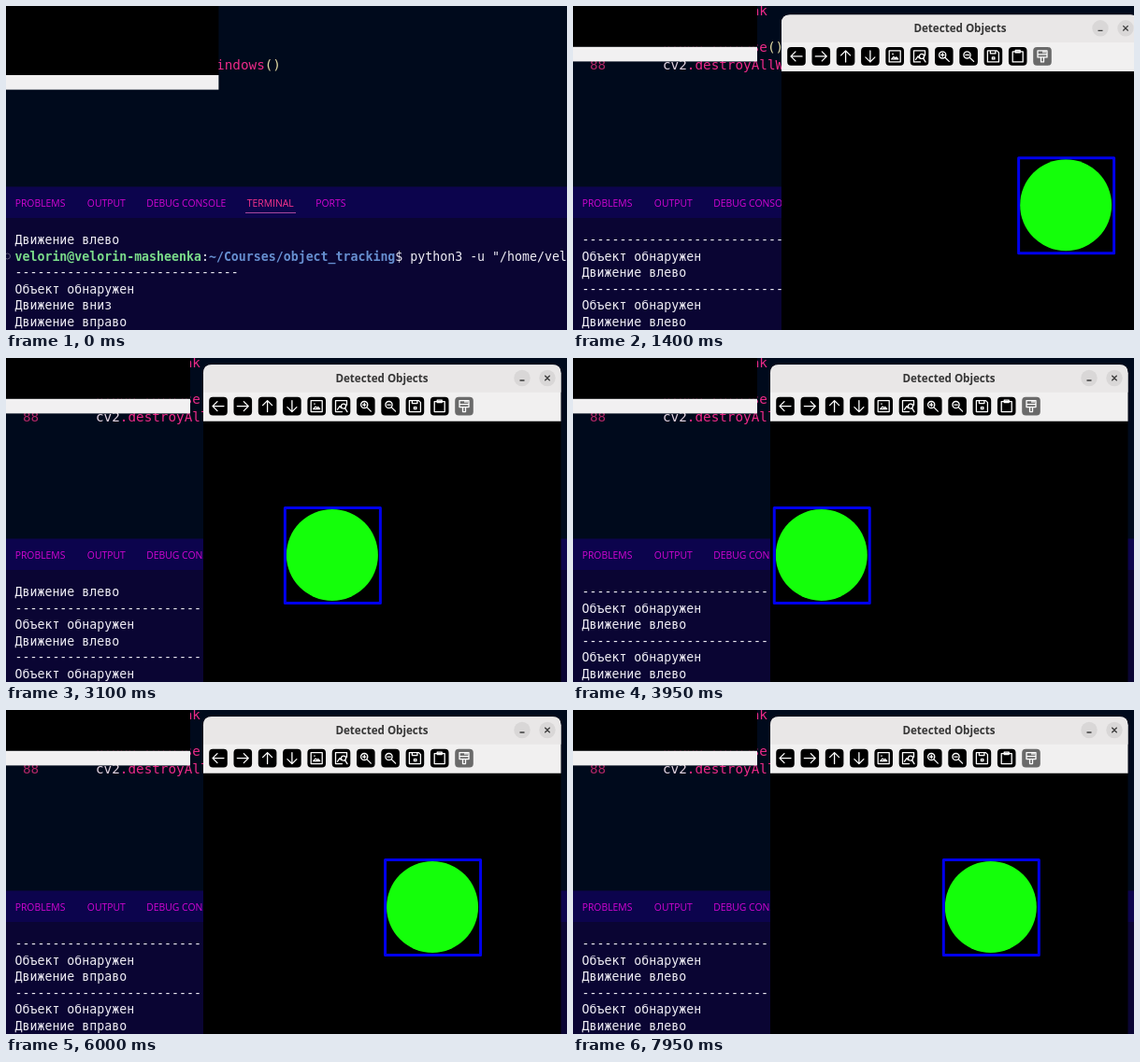
Animation, 600 px wide and 347 px high, one loop 8000 ms. Source, as an HTML page:

```html
<!DOCTYPE html>
<html lang="ru">
<head>
<meta charset="utf-8">
<title>Detected Objects</title>
<style>
  html, body { margin: 0; width: 100%; height: 100%; overflow: hidden; background: #000a1c; }
  svg { display: block; width: 600px; height: 347px; }
  .code { font: 14.3px "DejaVu Sans Mono", monospace; fill: #ec2a88; }
  .code .name { fill: #e2d3e0; }
  .code .paren { fill: #e0d8a2; }
  .tabs { font: 500 10.4px "Open Sans", sans-serif; fill: #d206d2; }
  .tabs .active { fill: #f8348c; }
  .term { font: 13.26px "DejaVu Sans Mono", monospace; fill: #efedf5; }
  .term .user { fill: #7bdc8a; font-weight: bold; }
  .term .path { fill: #668fd0; font-weight: bold; }
  .title { font: 700 11.6px "Open Sans", sans-serif; fill: #363636; text-anchor: middle; }
  .glyph { fill: none; stroke: #fff; stroke-width: 1.3; stroke-linecap: round; stroke-linejoin: round; }
</style>
</head>
<body>
<svg viewBox="0 0 600 347">
  <defs>
    <clipPath id="canvasClip"><rect y="60.5" width="382.5" height="300"/></clipPath>
  </defs>

  <rect width="600" height="347" fill="#000a1c"/>
  <g class="code">
    <text x="164.9" y="10">break</text>
    <text x="96" y="49">video.release<tspan class="paren">()</tspan></text>
    <text x="18" y="68" fill="#b02666">88</text>
    <text x="96" y="68"><tspan class="name">cv2</tspan>.destroyAllWindows<tspan class="paren">()</tspan></text>
  </g>

  <rect y="193.5" width="600" height="34" fill="#0c044d"/>
  <rect y="227" width="600" height="120" fill="#0a0533"/>
  <g class="tabs">
    <text x="9.7" y="214.5">PROBLEMS</text>
    <text x="86.8" y="214.5">OUTPUT</text>
    <text x="150.2" y="214.5">DEBUG CONSOLE</text>
    <text x="257.7" y="214.5" class="active">TERMINAL</text>
    <text x="331.2" y="214.5">PORTS</text>
    <rect x="256" y="221" width="54" height="1" fill="#a8489c"/>
  </g>

  <g class="term" id="shell">
    <circle cx="1.5" cy="268" r="3" fill="none" stroke="#5d5a78"/>
    <text x="9.5" y="272.6"><tspan class="user">velorin@velorin-masheenka</tspan>:<tspan class="path">~/Courses/object_tracking</tspan>$ python3 -u "/home/velorin/Courses"</text>
  </g>
  <g class="term" id="log"></g>

  <g id="cover">
    <rect id="coverBody" fill="#000"/>
    <rect id="coverEdge" height="15.6" fill="#f1f0f1"/>
  </g>

  <g id="win">
    <path d="M0 360V9Q0 0 9 0H373.5Q382.5 0 382.5 9V360Z" fill="#000"/>
    <path d="M0 60.5V9Q0 0 9 0H373.5Q382.5 0 382.5 9V60.5Z" fill="#f1f0f0"/>
    <path d="M0 29.5V9Q0 0 9 0H373.5Q382.5 0 382.5 9V29.5Z" fill="#e9e7e7"/>
    <text class="title" x="191" y="18.5">Detected Objects</text>
    <g fill="#d9d7d7"><circle cx="341" cy="14.3" r="8.7"/><circle cx="368" cy="14.3" r="8.7"/></g>
    <path d="M338.5 16.8h5M365.3 11.6l5.4 5.4m0-5.4l-5.4 5.4" stroke="#3c3c3c" stroke-width="1.3" fill="none"/>
    <g id="tools"></g>
    <g clip-path="url(#canvasClip)">
      <g id="ball">
        <circle r="49" fill="#14ff0a"/>
        <rect x="-50.5" y="-50.5" width="102" height="102" fill="none" stroke="#0000ec" stroke-width="3" stroke-linejoin="round"/>
      </g>
    </g>
  </g>
</svg>

<script>
const LOOP = 8000, OPEN = 300, LINE = 17.6;
const $ = id => document.getElementById(id);
const SVG = 'http://www.w3.org/2000/svg';

function add(parent, tag, attrs) {
  const el = document.createElementNS(SVG, tag);
  for (const key in attrs) el.setAttribute(key, attrs[key]);
  return parent.appendChild(el);
}

// Toolbar glyphs, drawn around the centre of each button
const lens = 'M2 -1.5a3.6 3.6 0 1 0 -7.2 0a3.6 3.6 0 1 0 7.2 0M1.2 1.3L5.5 5.5';
const frame = 'M-6 -6H6V6H-6Z';
const glyphs = [
  'M6 0H-6M-1 -5L-6 0L-1 5',
  'M-6 0H6M1 -5L6 0L1 5',
  'M0 6V-6M-5 -1L0 -6L5 -1',
  'M0 -6V6M-5 1L0 6L5 1',
  frame + 'M-3.5 3L-1.2 .5L.5 2L1.8 1L3.5 3ZM-2.5 -2.5h.6',
  'M6 -1V-6H-6V6H1M-4 3.5L-1.5 0L0 2M5 0a2.5 2.5 0 1 0 -5 0a2.5 2.5 0 1 0 5 0M4 2L6.5 6',
  lens + 'M-3.2 -1.5H.2M-1.5 -3.2V.2',
  lens + 'M-3.2 -1.5H.2',
  'M-6 -6H4L6 -4V6H-6ZM-3 -5.5V-3H2.5V-5.5M-1 1H1.5V3H-1Z',
  'M-5.5 -5H5.5V6H-5.5ZM-2.5 -6.5H2.5V-4H-2.5Z',
  'M-5 -6H5V1H-5ZM-5 -2H5M-1.5 1V6H1.5V1M1 -6V-4M3 -6V-4'
];
glyphs.forEach((d, i) => {
  const g = add($('tools'), 'g', { transform: `translate(${16 + 26.3 * i} 44.4)` });
  add(g, 'rect', { x: -9.8, y: -9.8, width: 19.6, height: 19.6, rx: 4, fill: i < 10 ? '#000' : '#6a6a6a' });
  add(g, 'path', { d, class: 'glyph' });
});

const rows = Array.from({ length: 6 }, (_, i) =>
  add($('log'), 'text', { x: 9.5, y: 255 + LINE * i }));

// [time, x] of the ball inside the window; it bounces off both sides
const ballSteps = [[0, 230], [1075, 336], [4015, 48.5], [6925, 336.5], [8000, 231]];
// [time, x, y] of the dragged window
const winSteps = [[0, 197, 5.5], [1000, 197, 5.5], [1400, 223, 9.5], [1900, 219, 3],
  [2200, 213, 2], [2600, 211, 7.2], [8000, 211, 7.2]];

function at(steps, t) {
  const n = Math.max(1, steps.findIndex(s => s[0] > t));
  const a = steps[n - 1], b = steps[n];
  const k = (t - a[0]) / (b[0] - a[0]);
  return a.slice(1).map((v, i) => v + (b[i + 1] - v) * k);
}

const RULE = '-'.repeat(30), FOUND = 'Объект обнаружен';
const move = dir => 'Движение ' + dir;
const heading = t => move(t > 1075 && t < 4015 || t > 6925 ? 'влево' : 'вправо');
const startLog = [move('влево'), '', RULE, FOUND, move('вниз'), move('вправо')];

function logLines(t) {
  if (t < OPEN) return startLog;
  const now = heading(t), before = heading(t - 150);
  // The output is now and then caught in the middle of a report
  const partial = Math.floor(t / 50) % 14 === 6;
  return partial
    ? [before, RULE, FOUND, now, RULE, FOUND]
    : [RULE, FOUND, before, RULE, FOUND, now];
}

function setCover(w, h) {
  $('coverBody').setAttribute('width', w);
  $('coverBody').setAttribute('height', h);
  $('coverEdge').setAttribute('width', w);
  $('coverEdge').setAttribute('y', h);
}

function draw(t) {
  const open = t >= OPEN;
  $('win').style.display = open ? '' : 'none';
  $('shell').style.display = open ? 'none' : '';
  if (open) setCover(197, 43.8); else setCover(227.4, 74);

  const [wx, wy] = at(winSteps, t), [bx] = at(ballSteps, t);
  $('win').setAttribute('transform', `translate(${wx.toFixed(2)} ${wy.toFixed(2)})`);
  $('ball').setAttribute('transform', `translate(${bx.toFixed(2)} 203.7)`);
  logLines(t).forEach((line, i) => {
    if (rows[i].textContent !== line) rows[i].textContent = line;
  });
}

const start = performance.now();
function tick() {
  draw((performance.now() - start) % LOOP);
  requestAnimationFrame(tick);
}
draw(0);
requestAnimationFrame(tick);
</script>
</body>
</html>
```
